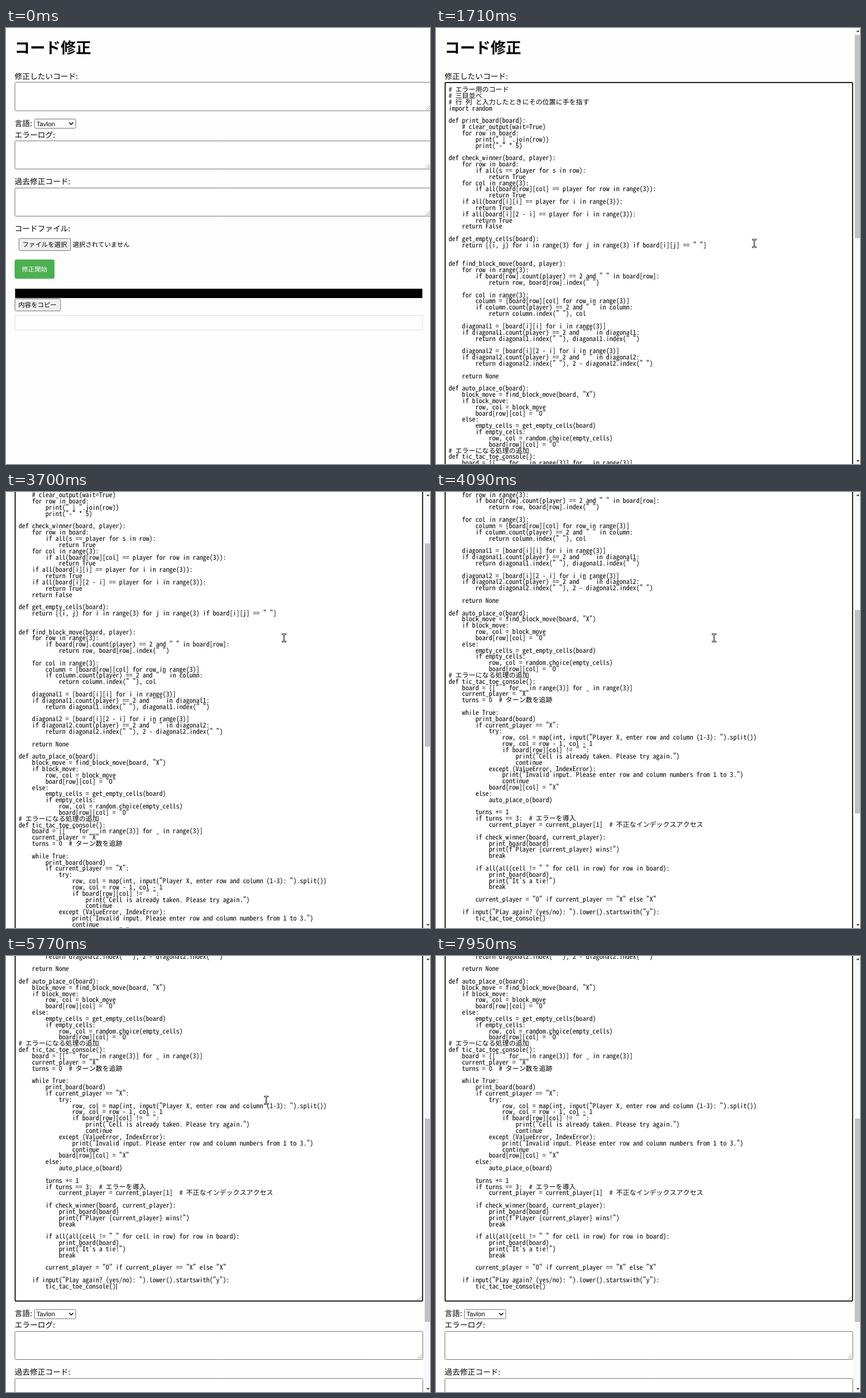
Recreate the animation shown at these times as an HTML page with a canvas. Size 738x759 px, loop 8000 ms.

```html
<!DOCTYPE html>
<html lang="ja">
<head>
<meta charset="utf-8">
<style>
html, body { margin: 0; width: 100%; height: 100%; overflow: hidden; background: #fefefe; }
canvas { display: block; }
</style>
</head>
<body>
<canvas id="stage" width="738" height="759"></canvas>
<script>
const ctx = document.getElementById('stage').getContext('2d');
const W = 738, H = 759, LOOP = 8000;
const FOCUS = 1020, PASTE = 1280;
const ZOOM = 5 / 6, LABEL = 16 * ZOOM, SMALL = 40 / 3 * ZOOM, CODE = 14 * ZOOM;
const LINE = 10.838, NOTCH = 100 * ZOOM, GROWTH = 1040.3;
const SANS = '"Noto Sans CJK JP", "Noto Sans CJK", sans-serif';
const ARIAL = '"Liberation Sans", Arial, sans-serif';
const MONO = '"Noto Sans Mono CJK JP", "Noto Sans CJK JP", monospace';

const code = `# エラー用のコード
# 三目並べ
# 行 列 と入力したときにその位置に手を指す
import random

def print_board(board):
    # clear_output(wait=True)
    for row in board:
        print(" | ".join(row))
        print("-" * 5)

def check_winner(board, player):
    for row in board:
        if all(s == player for s in row):
            return True
    for col in range(3):
        if all(board[row][col] == player for row in range(3)):
            return True
    if all(board[i][i] == player for i in range(3)):
        return True
    if all(board[i][2 - i] == player for i in range(3)):
        return True
    return False

def get_empty_cells(board):
    return [(i, j) for i in range(3) for j in range(3) if board[i][j] == " "]


def find_block_move(board, player):
    for row in range(3):
        if board[row].count(player) == 2 and " " in board[row]:
            return row, board[row].index(" ")

    for col in range(3):
        column = [board[row][col] for row in range(3)]
        if column.count(player) == 2 and " " in column:
            return column.index(" "), col

    diagonal1 = [board[i][i] for i in range(3)]
    if diagonal1.count(player) == 2 and " " in diagonal1:
        return diagonal1.index(" "), diagonal1.index(" ")

    diagonal2 = [board[i][2 - i] for i in range(3)]
    if diagonal2.count(player) == 2 and " " in diagonal2:
        return diagonal2.index(" "), 2 - diagonal2.index(" ")

    return None

def auto_place_o(board):
    block_move = find_block_move(board, "X")
    if block_move:
        row, col = block_move
        board[row][col] = "O"
    else:
        empty_cells = get_empty_cells(board)
        if empty_cells:
            row, col = random.choice(empty_cells)
            board[row][col] = "O"
# エラーになる処理の追加
def tic_tac_toe_console():
    board = [[" " for _ in range(3)] for _ in range(3)]
    current_player = "X"
    turns = 0  # ターン数を追跡

    while True:
        print_board(board)
        if current_player == "X":
            try:
                row, col = map(int, input("Player X, enter row and column (1-3): ").split())
                row, col = row - 1, col - 1
                if board[row][col] != " ":
                    print("Cell is already taken. Please try again.")
                    continue
            except (ValueError, IndexError):
                print("Invalid input. Please enter row and column numbers from 1 to 3.")
                continue
            board[row][col] = "X"
        else:
            auto_place_o(board)

        turns += 1
        if turns == 3:  # エラーを導入
            current_player = current_player[1]  # 不正なインデックスアクセス

        if check_winner(board, current_player):
            print_board(board)
            print(f"Player {current_player} wins!")
            break

        if all(all(cell != " " for cell in row) for row in board):
            print_board(board)
            print("It's a tie!")
            break

        current_player = "O" if current_player == "X" else "X"

    if input("Play again? (yes/no): ").lower().startswith("y"):
        tic_tac_toe_console()`.split('\n');

// Stepped progress: the first step lands at start, the last at end.
function progress(t, start, end, steps) {
  const step = Math.floor((t - start + 8) / (end - start) * (steps - 1)) + 1;
  return t < start ? 0 : Math.min(step, steps) / steps;
}
const arc = p => Math.sin(Math.PI * p);
const easeOut = p => 1 - (1 - p) ** 2;

function scrollAt(t) {
  if (t < PASTE) return 0;
  const back = 5 * (1 - progress(t, 1560, 1710, 2));
  const down = 5 * progress(t, 3430, 4090, 6) ** 1.32;
  const further = 2 * progress(t, 4370, 4820, 4);
  return NOTCH * (back + down + further);
}

function pointerAt(t) {
  const arrive = easeOut(progress(t, 500, 1020, 5));
  const drop = progress(t, 1560, 1710, 2);
  const loop = progress(t, 2320, 3280, 8);
  const drift = progress(t, 5350, 6310, 8);
  const leave = progress(t, 6460, 6610, 2);
  return {
    x: 740 - 125 * arrive - 61 * drop - 70 * loop - 270 * arc(loop)
      - 8 * drift - 27 * arc(drift) + 124 * leave,
    y: 135 - 31 * arrive + 271 * drop - 121 * loop - 200 * arc(loop)
      + 166 * drift ** 5 - 8 * arc(drift) + 120 * leave,
    visible: arrive > 0 && leave < 1
  };
}

function caretVisible(t) {
  return t < PASTE ? t >= FOCUS : (t + 830) % 1030 < 530;
}

function text(str, x, y, size = LABEL, color = '#000', family = SANS, weight = 400) {
  ctx.font = `${weight} ${size}px ${family}`;
  ctx.fillStyle = color;
  ctx.fillText(str, x, y);
}

function box(x, y, w, h, { fill, stroke, line = 1, radius = 0 }) {
  const inset = stroke ? line / 2 : 0;
  ctx.beginPath();
  ctx.roundRect(x + inset, y + inset, w - 2 * inset, h - 2 * inset, radius);
  if (fill) { ctx.fillStyle = fill; ctx.fill(); }
  if (stroke) { ctx.strokeStyle = stroke; ctx.lineWidth = line; ctx.stroke(); }
}

function path(points, color, width) {
  ctx.beginPath();
  points.forEach(([x, y]) => ctx.lineTo(x, y));
  if (width) { ctx.strokeStyle = color; ctx.lineWidth = width; ctx.stroke(); }
  else { ctx.fillStyle = color; ctx.fill(); }
}

function textarea(y, h, right, focused) {
  box(15, y, right - 15, h, {
    fill: '#fff', stroke: focused ? '#000' : '#767676', line: focused ? 2 * ZOOM : 1, radius: 2
  });
  const bottom = y + h - 2, edge = right - 2;
  for (const size of [7, 3]) {
    path([[edge - size, bottom], [edge, bottom - size]], '#777', 0.8);
  }
}

function button(label, x, y, w) {
  box(x, y, w, 22, { fill: '#efefef', stroke: '#767676', radius: 2.5 });
  text(label, x + 6.5, y + 15, SMALL);
}

function form(right) {
  text('言語:', 15, 170.5);
  box(49, 158, 73, 17, { fill: '#fff', stroke: '#767676', radius: 2 });
  text('Tavlon', 53, 170.5, SMALL, '#000', ARIAL);
  path([[110, 164.5], [113.5, 168], [117, 164.5]], '#000', 1.6);
  text('エラーログ:', 15, 190.5);
  textarea(196, 50, right);
  text('過去修正コード:', 15, 272);
  textarea(278, 50, right);
  text('コードファイル:', 15, 353.5);
  button('ファイルを選択', 22, 366, 91);
  text('選択されていません', 116, 381, SMALL);
  box(15, 403, 69.5, 33.5, { fill: '#4caf50', radius: 3.5 });
  text('修正開始', 27.5, 423.7, SMALL, '#fff');
  box(15, 453, 710.5, 18, { fill: '#000', stroke: '#ddd' });
  button('内容をコピー', 15, 471, 80.5);
  box(15, 500, 710.5, 26, { stroke: '#ddd' });
}

function scrollbar(scroll) {
  box(727, 0, 15, H, { fill: '#f8f8f8' });
  box(729, 12 + scroll / 2.153, 11, 354, { fill: '#c1c1c1' });
  path([[731.5, 7], [737.5, 7], [734.5, 3.5]], '#505050');
  path([[731.5, 752], [737.5, 752], [734.5, 755.5]], '#505050');
}

function pointer(x, y) {
  const layer = (color, width, half) => {
    for (const end of [-6.5, 6.5]) path([[x - half, y + end], [x + half, y + end]], color, width);
    path([[x, y - 6.5], [x, y + 6.5]], color, width);
  };
  layer('#333', 2.6, 4);
  layer('#ddd', 0.9, 3.3);
}

function draw(t) {
  const pasted = t >= PASTE;
  const scroll = scrollAt(t);
  const right = pasted ? 726 : 740;
  const growth = pasted ? GROWTH : 0;

  ctx.fillStyle = '#fefefe';
  ctx.fillRect(0, 0, W, H);
  ctx.save();
  ctx.translate(0, -scroll);
  text('コード修正', 15, 44, 2 * LABEL, '#000', SANS, 700);
  text('修正したいコード:', 15, 88.5);
  textarea(94, 50.5 + growth, right, t >= FOCUS);
  if (pasted) code.forEach((line, i) => text(line, 22, 111 + i * LINE, CODE, '#000', MONO));
  if (caretVisible(t)) {
    ctx.fillStyle = '#000';
    if (pasted) ctx.fillRect(192, 102 + (code.length - 1) * LINE, 1, 11);
    else ctx.fillRect(23, 101, 1, 12);
  }
  ctx.translate(0, growth);
  form(right);
  ctx.restore();

  if (pasted) scrollbar(scroll);
  const { x, y, visible } = pointerAt(t);
  if (visible) pointer(x, y);
}

function frame() {
  ctx.textRendering = 'geometricPrecision';
  draw(performance.now() % LOOP);
  requestAnimationFrame(frame);
}
frame();
</script>
</body>
</html>
```
